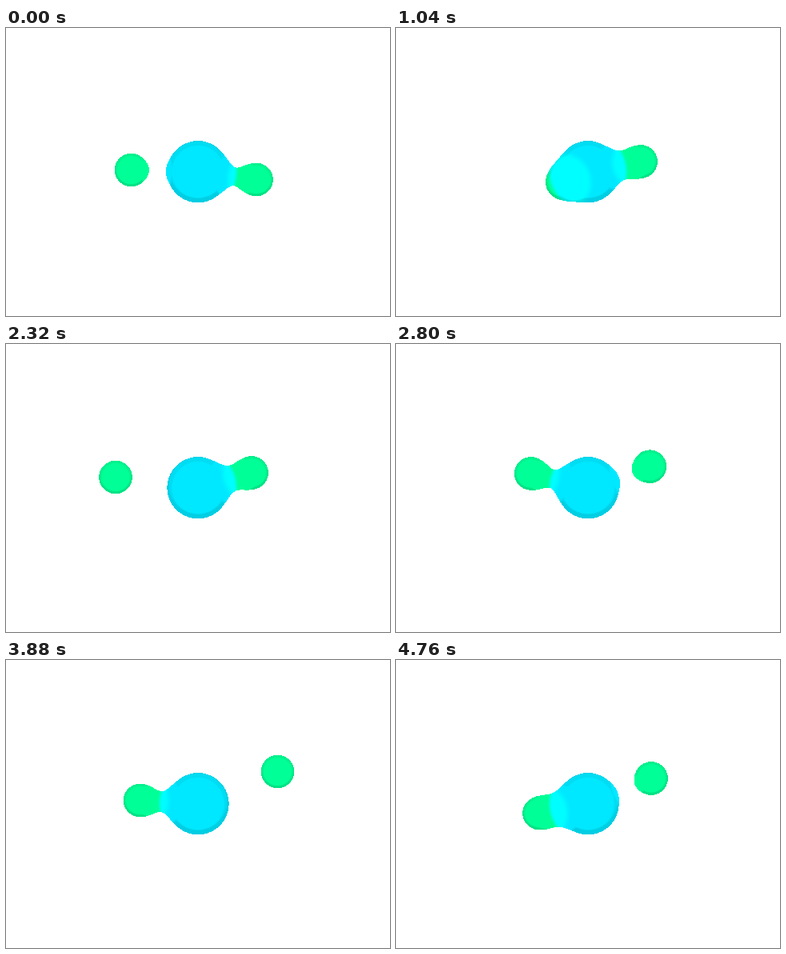
Recreate the animation shown at these times as an HTML page with a canvas. Size 480x360 px, loop 4800 ms.

```html
<!DOCTYPE html>
<html lang="en">
<head>
<meta charset="utf-8">
<title>Gooey drops</title>
<style>
html, body { margin: 0; width: 100%; height: 100%; overflow: hidden; background: #fff; }
canvas { display: block; width: 480px; height: 360px; }
</style>
</head>
<body>
<canvas id="stage" width="480" height="360"></canvas>
<script>
const ctx = document.getElementById('stage').getContext('2d');
const LOOP = 4800, STEP = 40;
const CX = 240, CY = 179.7, CORE_R = 38.6, DROP_R = 20.8, BLEND = 35;
const BOX = { x: 100, y: 105, w: 300, h: 140 };
const CORE = [0, 232, 255], BRIGHT = [0, 253, 255], DROP = [0, 255, 150];

// Turning points: time in ms, offset from the centre of the stage
const LEFT = [
  [0, -83.5, -2.5], [280, -108.5, 17], [500, -88, 32.5], [1040, -32, 13],
  [1720, -88.5, 3], [2320, -103, -13.5], [3240, -45, -18], [3880, -72.5, -4.5],
  [4760, -61, 11.5]
];
const RIGHT = [
  [0, 73, 9.5], [1040, 66, -13], [1470, 105.5, -20], [1720, 91.5, -24.5],
  [2320, 67, -19], [3240, 96, -36.5], [3580, 124.5, -44.5], [3880, 99.5, -40.5],
  [4760, 79, -32]
];

const clamp = v => Math.max(0, Math.min(1, v));
const mix = (a, b, h) => a + (b - a) * h;
const smooth = (lo, hi, v) => {
  const h = clamp((v - lo) / (hi - lo));
  return h * h * (3 - 2 * h);
};
const smin = (a, b, k) => {
  const h = Math.max(k - Math.abs(a - b), 0) / k;
  return Math.min(a, b) - h * h * k / 4;
};

function slope(path, i, axis) {
  const a = path[i - 1], b = path[i + 1];
  return a && b ? (b[axis] - a[axis]) / (b[0] - a[0]) : 0;
}

// Cubic Hermite curve through the turning points, at rest at both ends
function along(path, t) {
  let i = 0;
  while (i < path.length - 2 && t > path[i + 1][0]) i++;
  const a = path[i], b = path[i + 1], span = b[0] - a[0];
  const u = clamp((t - a[0]) / span), v = 1 - u;
  const at = axis =>
    a[axis] * (1 + 2 * u) * v * v + slope(path, i, axis) * span * u * v * v +
    b[axis] * u * u * (3 - 2 * u) - slope(path, i + 1, axis) * span * u * u * v;
  const dx = at(1), dy = at(2);
  // A drop passing close to the core floats in front and merges less
  return { x: 240 + dx, y: 180 + dy, k: BLEND * clamp(Math.hypot(dx, dy) / 65) + 1 };
}

function draw(time) {
  const left = along(LEFT, time), right = along(RIGHT, time);
  const core = (x, y) => Math.hypot(x - CX, y - CY) - CORE_R;
  const drop = (p, x, y) => Math.hypot(x - p.x, y - p.y) - DROP_R;
  const field = (x, y) =>
    smin(smin(core(x, y), drop(left, x, y), left.k), drop(right, x, y), right.k);

  const image = ctx.createImageData(BOX.w, BOX.h);
  for (let j = 0, k = 0; j < BOX.h; j++) {
    for (let i = 0; i < BOX.w; i++, k += 4) {
      const x = BOX.x + i + 0.5, y = BOX.y + j + 0.5;
      const d = field(x, y);
      if (d > 0) continue;

      const near = Math.min(drop(left, x, y), drop(right, x, y));
      const green = smooth(6, 13, core(x, y));
      const lift = smooth(20, 10, near);

      // Rounded surface lit from the front and slightly above
      const bulge = clamp(1 + d / mix(CORE_R, DROP_R, green));
      const nx = (field(x + 0.5, y) - field(x - 0.5, y)) * bulge;
      const ny = (field(x, y + 0.5) - field(x, y - 0.5)) * bulge;
      const nz = Math.sqrt(Math.max(0, 1 - nx * nx - ny * ny));
      const rim = 1 - smooth(0.48, 0.58, nz);
      const under = 1 - smooth(0.3, 0.4, nz * 0.98 - ny * 0.2);
      const light = 1 - 0.05 * rim - 0.06 * under;

      for (let c = 0; c < 3; c++) {
        const base = mix(CORE[c], BRIGHT[c], lift);
        image.data[k + c] = mix(base, DROP[c], green) * light;
      }
      image.data[k + 3] = 255;
    }
  }
  ctx.clearRect(0, 0, 480, 360);
  ctx.putImageData(image, BOX.x, BOX.y);
}

const start = performance.now();
let shown = -1;
function tick() {
  const elapsed = (performance.now() - start) % LOOP;
  const time = Math.floor(elapsed / STEP) * STEP;
  if (time !== shown) draw(shown = time);
  requestAnimationFrame(tick);
}
tick();
</script>
</body>
</html>
```
